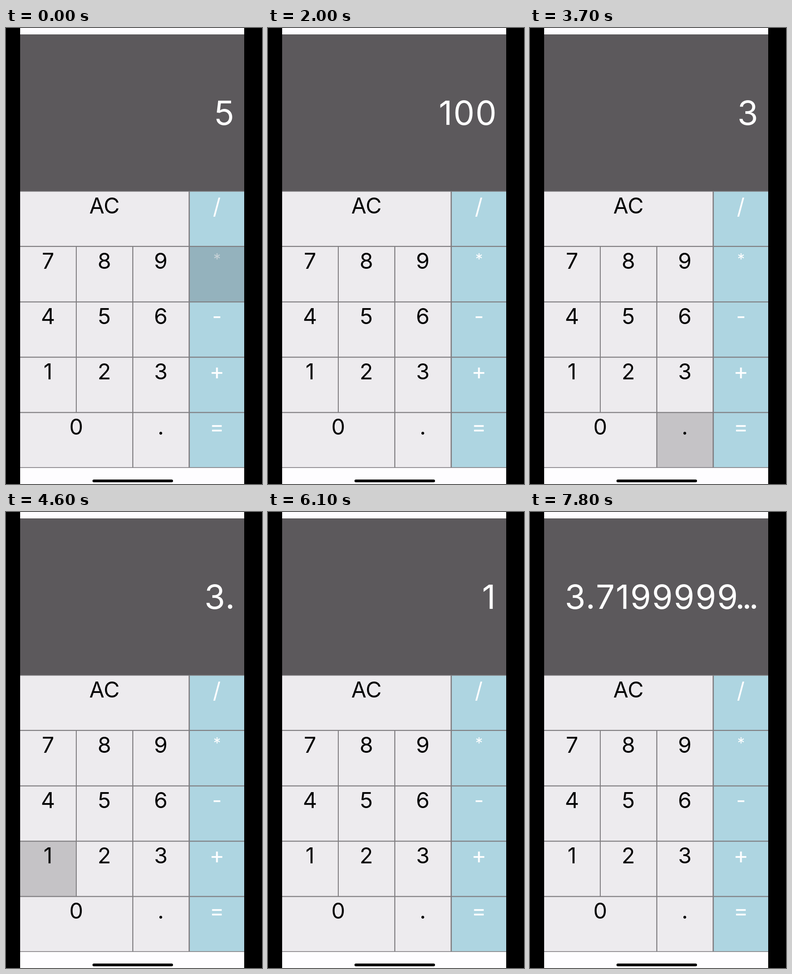
Animation, 561 px wide and 998 px high, one loop 8000 ms. Source, as an HTML page with a canvas:

```html
<!DOCTYPE html>
<html lang="en">
<head>
<meta charset="utf-8">
<title>Calculator</title>
<style>
  html, body { margin: 0; width: 100%; height: 100%; overflow: hidden; background: #000; }
  canvas { display: block; width: 561px; height: 998px; }
</style>
</head>
<body>
<canvas id="stage" width="561" height="998"></canvas>
<script>
const ctx = document.getElementById("stage").getContext("2d");
const LOOP = 8000;
const FONT = "Inter, 'Liberation Sans', sans-serif";
const LEFT = 31, RIGHT = 522;
const COLS = [LEFT, 154, 278, 401.5, RIGHT];
const ROWS = [357.5, 478, 599.5, 720.5, 841.5, 962];
const LINE = "#7f7d80";

// label, row, first column, last column
const KEYS = [
  ["AC", 0, 0, 3],
  ["7", 1, 0, 1], ["8", 1, 1, 2], ["9", 1, 2, 3],
  ["4", 2, 0, 1], ["5", 2, 1, 2], ["6", 2, 2, 3],
  ["1", 3, 0, 1], ["2", 3, 1, 2], ["3", 3, 2, 3],
  ["0", 4, 0, 2], [".", 4, 2, 3]
];

// label, vertical centre of the glyph, font size
const OPERATORS = [["/", 392, 48], ["*", 500, 33], ["-", 633, 46], ["+", 755, 50], ["=", 875.5, 48]];

// press time, release time, key, readout after release
const TAPS = [
  [0, 100, "*", "5"],
  [900, 1000, "2", "2"],
  [1100, 1200, "0", "20"],
  [1400, 1500, "=", "100"],
  [2400, 2500, "AC", "0"],
  [2900, 3000, "3", "3"],
  [3700, 3800, ".", "3."],
  [4600, 4700, "1", "3.1"],
  [5200, 5300, "*", "3.1"],
  [5800, 5900, "1", "1"],
  [6600, 6700, ".", "1."],
  [6900, 7000, "2", "1.2"],
  [7400, 7500, "=", "3.7199999..."]
];

function rect(x1, y1, x2, y2, color) {
  ctx.fillStyle = color;
  ctx.fillRect(x1, y1, x2 - x1, y2 - y1);
}

function setText(size, color, spacing = 0) {
  ctx.font = `400 ${size}px ${FONT}`;
  ctx.letterSpacing = spacing + "px";
  ctx.fillStyle = color;
}

function textEndingAt(text, right, baseline) {
  ctx.textAlign = "left";
  ctx.fillText(text, right - ctx.measureText(text).actualBoundingBoxRight, baseline);
}

function textCentredAt(text, x, y) {
  ctx.textAlign = "left";
  const m = ctx.measureText(text);
  ctx.fillText(text,
    x - (m.actualBoundingBoxRight - m.actualBoundingBoxLeft) / 2,
    y + (m.actualBoundingBoxAscent - m.actualBoundingBoxDescent) / 2);
}

function drawReadout(text) {
  const long = text.endsWith("...");
  const number = long ? text.slice(0, -3) : text;
  setText(73.5, "#fff", 2);
  textEndingAt(number, long ? 452 : number.endsWith("1") ? 493 : 496.5, 212);
  if (long) {
    setText(73.5, "#fff", -6);
    textEndingAt("...", 496, 212);
  }
}

function drawKey([label, row, from, to], pressed) {
  const x1 = COLS[from], x2 = COLS[to];
  rect(x1, ROWS[row], x2, ROWS[row + 1], pressed ? "#c5c3c6" : "#edebee");
  setText(48, "#050505");
  ctx.textAlign = "center";
  ctx.fillText(label, (x1 + x2) / 2 - 0.5, ROWS[row] + 48.7);
}

function drawOperator([label, y, size], row, pressed) {
  rect(COLS[3], ROWS[row], RIGHT, ROWS[row + 1], pressed ? "#94b2bd" : "#aed5e1");
  setText(size, pressed ? "#c6d1d6" : "#fdfeff");
  textCentredAt(label, 462.3, y);
}

function drawGrid() {
  ROWS.forEach((y, i) => {
    const half = i % 5 ? 1.1 : 0.8;
    rect(LEFT, y - half, RIGHT, y + half, LINE);
  });
  rect(153, ROWS[1], 155, ROWS[4], LINE);
  rect(276.8, ROWS[1], 279, ROWS[5], LINE);
  rect(400.2, ROWS[0], 402.8, ROWS[5], LINE);
}

function draw(time) {
  const active = TAPS.find(([down, up]) => time >= down && time < up);
  const pressed = active ? active[2] : "";
  const readout = TAPS.reduce((text, tap) => time >= tap[1] ? tap[3] : text, "5");

  rect(0, 0, 561, 998, "#000");
  rect(LEFT, 0, RIGHT, 998, "#fefdff");
  rect(LEFT, 14, RIGHT, ROWS[0], "#5c595c");
  drawReadout(readout);
  KEYS.forEach(key => drawKey(key, key[0] === pressed));
  OPERATORS.forEach((op, row) => drawOperator(op, row, op[0] === pressed));
  drawGrid();

  ctx.fillStyle = "#000";
  ctx.beginPath();
  ctx.roundRect(189.5, 988.3, 176.5, 6, 3);
  ctx.fill();
}

const start = performance.now();
function tick() {
  draw((performance.now() - start) % LOOP);
  requestAnimationFrame(tick);
}
tick();
</script>
</body>
</html>
```
